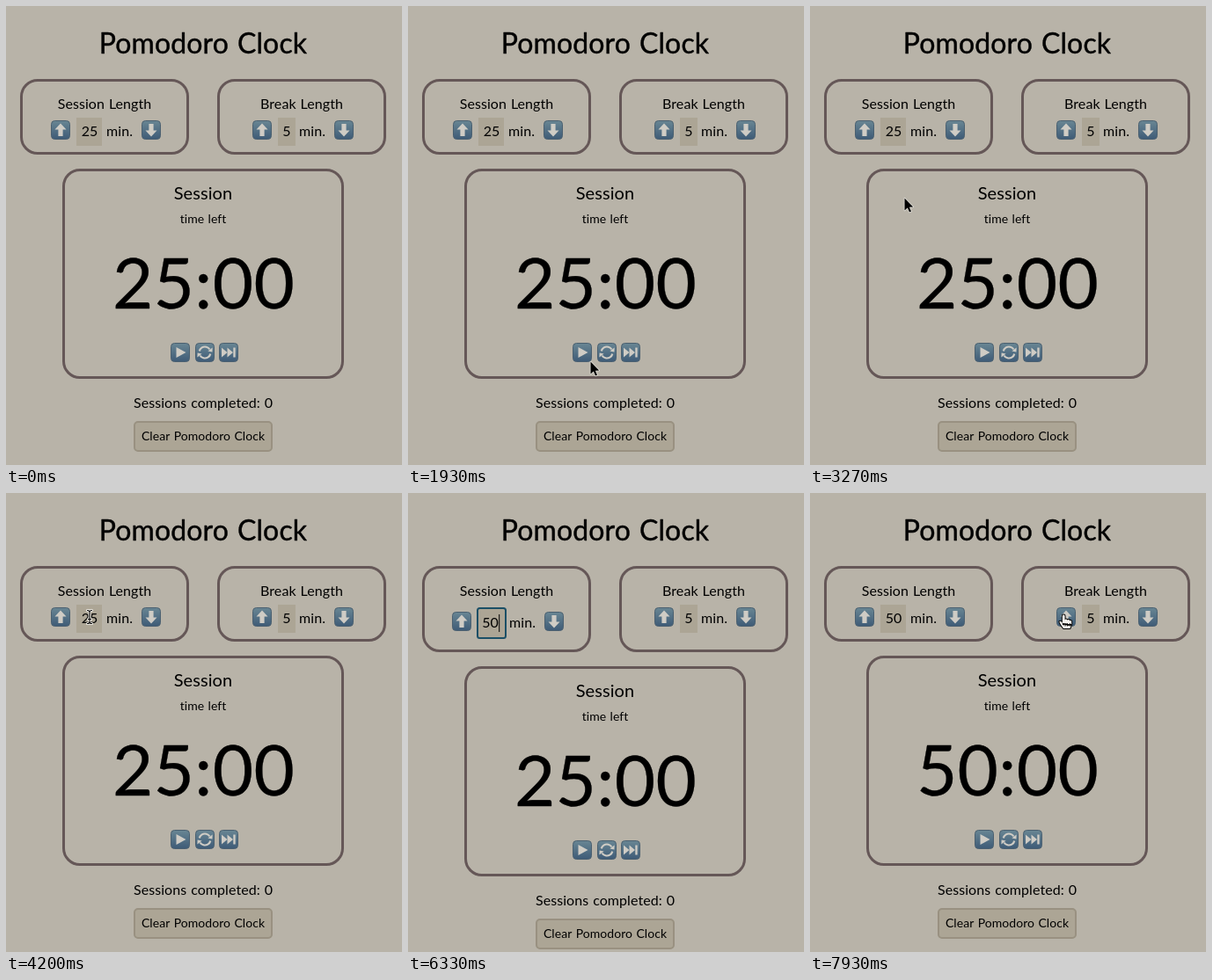
An HTML page with a canvas that plays this animation: 450 by 522 pixels, repeating every 8000 ms.

```html
<!DOCTYPE html>
<html lang="en">
<head>
<meta charset="utf-8">
<title>Pomodoro Clock</title>
<style>
html, body { margin: 0; width: 100%; height: 100%; overflow: hidden; background: #b8b3a8; }
canvas { display: block; }
</style>
</head>
<body>
<canvas id="stage" width="450" height="522"></canvas>
<script>
const ctx = document.getElementById('stage').getContext('2d');
const LOOP = 8000;
const FOCUS = 4270, COMMIT = 6470;
const BG = '#b8b3a8', BORDER = '#655757', FIELD = '#aca595', RING = '#1b4f66';

// [time, x, y] of the pointer; it eases between neighbours
const PATH = [
  [460, 400, 530], [1000, 285, 440], [1500, 207, 404], [2550, 207, 404],
  [3270, 107, 218], [3800, 95, 141], [7200, 95, 141], [7870, 288, 139], [8000, 288, 139]
];
const TYPING = [[0, '25'], [4530, '2'], [4670, ''], [4870, '5'], [5070, '50']];

const smooth = p => p * p * (3 - 2 * p);

function pointerAt(t) {
  if (t < PATH[0][0] || (t > 4500 && t < 7200)) return null;
  const i = PATH.findIndex(k => k[0] > t);
  const [t0, x0, y0] = PATH[i - 1], [t1, x1, y1] = PATH[i];
  const p = smooth((t - t0) / (t1 - t0));
  return [x0 + (x1 - x0) * p, y0 + (y1 - y0) * p];
}

function typedAt(t) {
  return TYPING.filter(k => k[0] <= t).pop()[1];
}

function text(str, x, y, size, weight = 0) {
  ctx.font = `${size}px Lato, "Open Sans", sans-serif`;
  ctx.letterSpacing = size * 0.004 + 'px';
  ctx.wordSpacing = size * 0.05 + 'px';
  ctx.textAlign = 'center';
  ctx.fillStyle = '#000';
  ctx.fillText(str, x, y);
  if (weight) {
    ctx.strokeStyle = '#000';
    ctx.lineWidth = weight;
    ctx.lineJoin = 'round';
    ctx.strokeText(str, x, y);
  }
}

function box(x, y, w, h, r, fill, stroke, line) {
  ctx.beginPath();
  ctx.roundRect(x, y, w, h, r);
  if (fill) { ctx.fillStyle = fill; ctx.fill(); }
  if (stroke) { ctx.strokeStyle = stroke; ctx.lineWidth = line; ctx.stroke(); }
}

function poly(...pts) {
  ctx.beginPath();
  for (let i = 0; i < pts.length; i += 2) ctx.lineTo(pts[i], pts[i + 1]);
  ctx.closePath();
}

const GLYPHS = {
  up() {
    poly(0, -7.5, 6.5, -0.5, 2.6, -0.5, 2.6, 7, -2.6, 7, -2.6, -0.5, -6.5, -0.5);
    ctx.fill();
  },
  down() {
    ctx.rotate(Math.PI);
    GLYPHS.up();
  },
  play() {
    poly(-4.5, -6, 6.5, 0, -4.5, 6);
    ctx.fill();
  },
  skip() {
    for (const x of [-8, -1.5]) {
      poly(x, -5.5, x + 6.5, 0, x, 5.5);
      ctx.fill();
    }
    ctx.fillRect(5.3, -5.5, 2.4, 11);
  },
  reset() {
    ctx.lineWidth = 2.2;
    for (let i = 0; i < 2; i++) {
      ctx.beginPath();
      ctx.arc(0, 0, 6.5, Math.PI * 1.08, Math.PI * 1.82);
      ctx.stroke();
      poly(8.6, -5.6, 8.4, -0.6, 3.4, -1.4);
      ctx.fill();
      ctx.rotate(Math.PI);
    }
  }
};

function icon(name, x, y) {
  const fill = ctx.createLinearGradient(0, y - 11, 0, y + 11);
  fill.addColorStop(0, '#6a8794');
  fill.addColorStop(1, '#3d5a76');
  box(x - 10.5, y - 10.5, 21, 21, 4, fill, '#4b6070', 1);
  ctx.save();
  ctx.translate(x, y);
  ctx.fillStyle = ctx.strokeStyle = '#cfccc5';
  GLYPHS[name]();
  ctx.restore();
}

function lengths(t, focused, drop) {
  for (const x of [17.5, 241.5]) box(x, 84.5, 189, 83 + drop, 18.5, null, BORDER, 3);

  text('Session Length', 112, 117, 16);
  if (focused) {
    const value = typedAt(t);
    icon('up', 61, 146);
    icon('down', 166, 146);
    box(79, 131, 32, 34, 2.5, FIELD, RING, 2);
    text(value, 84 + value.length * 4.8, 153, 16);
    if ((t - 5070 + 1000) % 1000 < 530) {
      ctx.fillStyle = '#000';
      ctx.fillRect(84 + value.length * 9.6, 138, 1, 20);
    }
    text('min.', 130, 153, 16);
  } else {
    icon('up', 62, 141);
    icon('down', 165, 141);
    box(80, 127, 29, 32, 0, FIELD);
    text(t < COMMIT ? '25' : '50', 95, 148, 16);
    text('min.', 129, 148, 16);
  }

  text('Break Length', 336, 117, 16);
  icon('up', 291, 141);
  icon('down', 384, 141);
  box(309, 127, 20, 32, 0, FIELD);
  text('5', 319, 148, 16);
  text('min.', 348, 148, 16);
}

function timer(t) {
  box(65.5, 186.5, 317, 236, 18.5, null, BORDER, 3);
  text('Session', 224, 220, 20);
  text('time left', 224, 247, 14);
  text(t < COMMIT ? '25:00' : '50:00', 224.5, 343.5, 80, 0.3);
  icon('play', 198, 394);
  icon('reset', 226, 394);
  icon('skip', 253, 394);
  text('Sessions completed: 0', 224, 457, 16);
  box(146, 473, 156, 33, 4, FIELD, '#999181', 2);
  text('Clear Pomodoro Clock', 224, 494, 14);
}

function outlined(fill, edge, width) {
  ctx.lineJoin = 'round';
  ctx.strokeStyle = edge;
  ctx.lineWidth = width;
  ctx.stroke();
  ctx.fillStyle = fill;
  ctx.fill();
}

const CURSORS = {
  arrow() {
    poly(0.5, 0.5, 0.5, 14.5, 3.8, 11.5, 6, 16.5, 8, 15.6, 5.9, 10.8, 10.2, 10.5);
    outlined('#000', '#e9e7e0', 1.5);
  },
  beam() {
    ctx.lineCap = 'round';
    for (const [color, width] of [['#f0eee8', 3], ['#000', 1.1]]) {
      ctx.strokeStyle = color;
      ctx.lineWidth = width;
      ctx.beginPath();
      ctx.moveTo(-2.5, -7.5);
      ctx.quadraticCurveTo(0, -7.5, 0, -5.5);
      ctx.quadraticCurveTo(0, -7.5, 2.5, -7.5);
      ctx.moveTo(0, -5.5);
      ctx.lineTo(0, 5.5);
      ctx.quadraticCurveTo(0, 7.5, -2.5, 7.5);
      ctx.moveTo(0, 5.5);
      ctx.quadraticCurveTo(0, 7.5, 2.5, 7.5);
      ctx.moveTo(-1.5, 2.5);
      ctx.lineTo(1.5, 2.5);
      ctx.stroke();
    }
  },
  hand() {
    ctx.beginPath();
    ctx.roundRect(-1.2, -0.5, 2.8, 12, 1.4);
    ctx.roundRect(1.6, 4.5, 2.7, 7, 1.3);
    ctx.roundRect(4.3, 5, 2.7, 7, 1.3);
    ctx.roundRect(6.8, 6, 2.4, 6, 1.2);
    ctx.moveTo(-1.2, 9);
    ctx.quadraticCurveTo(-3, 6, -4.6, 7);
    ctx.quadraticCurveTo(-4.6, 9, 0, 15);
    ctx.lineTo(7.5, 15);
    ctx.lineTo(9.2, 10);
    ctx.closePath();
    outlined('#f4f2ee', '#000', 2);
    ctx.fillStyle = '#000';
    for (const x of [1.6, 4.2, 6.8]) ctx.fillRect(x, 9, 0.8, 3.5);
  }
};

const near = (x, y, cx, cy) => Math.abs(x - cx) < 10 && Math.abs(y - cy) < 10;
const BUTTONS = [[62, 141], [165, 141], [291, 141], [384, 141], [198, 394], [226, 394], [253, 394]];

function cursorKind(x, y) {
  if (y > 127 && y < 159 && ((x > 80 && x < 109) || (x > 309 && x < 329))) return 'beam';
  const overClear = x > 145 && x < 303 && y > 472 && y < 507;
  return overClear || BUTTONS.some(b => near(x, y, ...b)) ? 'hand' : 'arrow';
}

function draw(t) {
  const focused = t >= FOCUS && t < COMMIT;
  const drop = focused ? 12 : 0;
  ctx.fillStyle = BG;
  ctx.fillRect(0, 0, 450, 522);
  text('Pomodoro Clock', 224, 53.5, 32, 0.4);
  lengths(t, focused, drop);
  ctx.save();
  ctx.translate(0, drop);
  timer(t);
  ctx.restore();

  const pos = pointerAt(t);
  if (pos) {
    ctx.save();
    ctx.translate(...pos);
    CURSORS[cursorKind(...pos)]();
    ctx.restore();
  }
}

function tick() {
  draw(performance.now() % LOOP);
  requestAnimationFrame(tick);
}
tick();
</script>
</body>
</html>
```
